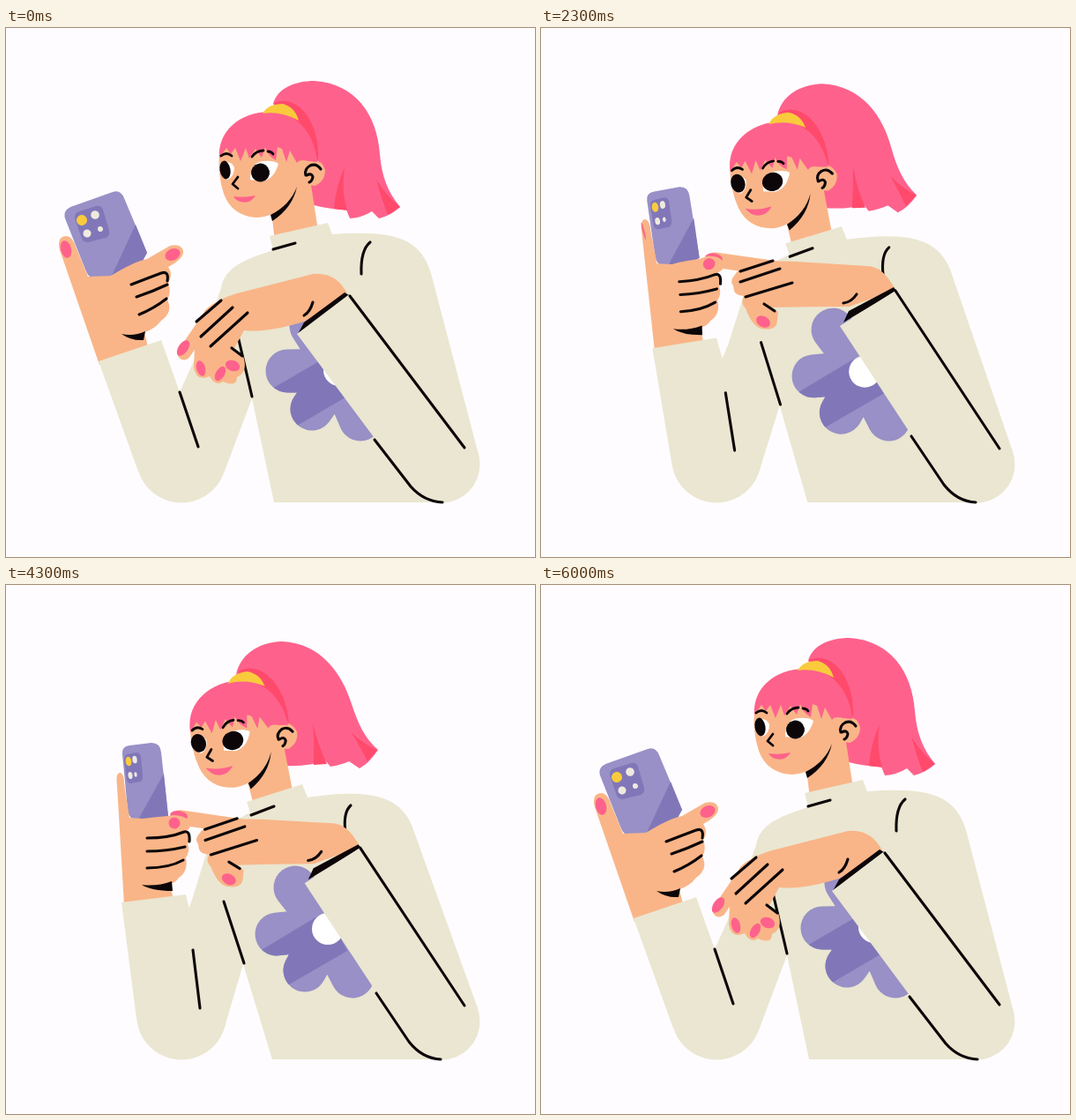
Write an HTML page with a canvas that moves like this. It is 600x600 px and loops after 6100 ms.

```html
<!DOCTYPE html>
<html lang="en">
<head>
<meta charset="utf-8">
<title>Scrolling on the phone</title>
<style>
  html, body { margin: 0; width: 100%; height: 100%; overflow: hidden; background: #fefcff; }
  canvas { display: block; width: 600px; height: 600px; }
</style>
</head>
<body>
<canvas id="stage" width="600" height="600"></canvas>
<script>
const ctx = document.getElementById('stage').getContext('2d');
const LOOP = 6100, STEP = 100;
const SHIRT = '#eae6d1', SKIN = '#f9b588', PINK = '#fe628c', DEEP = '#ff4a6c', INK = '#0c0609',
      LILAC = '#9890c6', VIOLET = '#8177b8', GOLD = '#f9cb3c', CREAM = '#efeade';

// Motion tracks: time, value, time, value, ...
const LEAN = [0,0, 200,.07, 500,.5, 800,.93, 1100,1, 1900,1, 2300,.83, 2600,.4, 2850,.08, 3000,0,
  3200,.07, 3500,.5, 3800,.93, 4200,1, 5000,1, 5300,.83, 5600,.4, 5850,.06, 6000,0, 6100,0];
const ARM = [0,0, 200,.26, 500,.7, 700,.9, 1000,1, 1900,1, 2100,.93, 2300,.82, 2600,.5, 2800,.15, 3000,0,
  3200,.26, 3500,.7, 3800,.92, 4200,1, 5000,1, 5300,.84, 5600,.54, 5800,.16, 6000,0, 6100,0];
const POINT = [0,0, 100,.03, 350,.55, 600,1, 5150,1, 5500,.5, 5800,.06, 6000,0, 6100,0];
const DROP = [0,0, 900,0, 1250,1, 1500,1, 1900,0, 3400,0, 3700,1, 4000,1, 4400,0, 6100,0];
const TIP = [0,262, 600,262, 950,251, 1300,266, 1600,266, 1900,251, 2300,263, 2600,270, 3300,270,
  3800,270, 4100,270, 4500,255, 4900,251, 5200,260, 6100,262];

const lerp = (a, b, k) => a + (b - a) * k;

// Smooth curve through the keys, flat at peaks and holds
function track(keys, t) {
  const last = keys.length / 2 - 1, T = i => keys[2 * i], V = i => keys[2 * i + 1];
  const slope = i => {
    if (i < 1 || i >= last || (V(i) - V(i - 1)) * (V(i + 1) - V(i)) <= 0) return 0;
    return (V(i + 1) - V(i - 1)) / (T(i + 1) - T(i - 1));
  };
  let i = 0;
  while (i < last - 1 && t >= T(i + 1)) i++;
  const d = T(i + 1) - T(i), u = (t - T(i)) / d, w = u * u * (3 - 2 * u);
  return lerp(V(i), V(i + 1), w) + d * (u * (1 - u) ** 2 * slope(i) - u * u * (1 - u) * slope(i + 1));
}

// Blend two path strings of the same structure
function mix(a, b, k) {
  const to = b.match(/[\d.]+/g);
  let i = 0;
  return a.replace(/[\d.]+/g, n => lerp(+n, +to[i++], k).toFixed(2));
}

function fill(d, color) {
  ctx.fillStyle = color;
  ctx.fill(new Path2D(d));
}

function line(d, width = 3.1, color = INK) {
  ctx.strokeStyle = color;
  ctx.lineWidth = width;
  ctx.stroke(new Path2D(d));
}

function oval(x, y, rx, ry, color, deg = 0) {
  ctx.fillStyle = color;
  ctx.beginPath();
  ctx.ellipse(x, y, Math.max(rx, 0), Math.max(ry, 0), deg * Math.PI / 180, 0, 7);
  ctx.fill();
}

function drawPonytail(k) {
  fill(mix('M303 86C308 68 328 60 350 60C396 63 421 98 424 143C426 168 433 186 447 203Q436 213 423 216L415 208Q404 215 390 216L386 206Q368 206 345 200L340 130Z',
           'M261 102C265 80 285 65 313 64C357 66 381 100 392 135C399 156 406 173 422 187Q412 202 401 208L389 200Q380 204 368 206L362 199Q345 206 317 205L305 140Z', k), PINK);
  fill(mix('M372 205Q374 180 384 158Q380 185 387 207Z', 'M349 204Q350 180 348 157Q354 182 364 203Z', k), DEEP);
  fill(mix('M420 172Q426 194 433 212L447 203Q431 190 420 172Z', 'M391 166Q402 184 410 200L421 187Q404 180 391 166Z', k), DEEP);
  fill(mix('M300 200L305 242L354 230L344 165Z', 'M272 215L281 250L326 238L313 172Z', k), SKIN);
}

function drawTorso(k) {
  fill(mix('M299 236L365 221L370 234C440 229 470 238 482 278L536 484L496 538L304 538L279 420L247 505L150 480L197 413L222 358L244 295C248 270 275 261 303 252Z',
           'M273 246L336 226L342 241C410 231 445 238 460 272L535 480L496 538L302 538L269 430L248 501L150 480L207 368L210 360L224 315C232 285 250 272 277 258Z', k), SHIRT);
  oval(494, 495, 43.5, 43.5, SHIRT);
  line(mix('M303 251L328 244', 'M278 261L304 251', k));
  line(mix('M413 243Q402 252 403 279', 'M391 250Q382 258 385 281', k));
  line(mix('M262 345L279 418', 'M247 359L270 429', k));
}

function drawFlower(k) {
  const petals = mix('M378 388L346 338M378 388L319 389M378 388L347 432M378 388L402 444',
                     'M365 390L328 343M365 390L307 396M365 390L339 437M365 390L393 444', k);
  line(petals, 49, LILAC);
  ctx.save();
  ctx.clip(new Path2D(mix('M295 413L362 374L380 372L402 409L320 457Z', 'M283 418L351 377L366 374L387 415L311 459Z', k)));
  line(petals, 49, VIOLET);
  ctx.restore();
  oval(lerp(378, 365, k), lerp(388, 390, k), 18, 18, '#fff');
}

function drawHead(k) {
  ctx.save();
  ctx.translate(lerp(346, 314.5, k), lerp(163, 170.5, k));
  ctx.rotate(-7 * k * Math.PI / 180);
  ctx.translate(-346, -163);
  fill('M304 85C330 74 356 105 354 150L320 110Z', DEEP);
  fill('M242 140Q240 168 247 188Q256 213 284 215Q306 214 322 196L332 176L350 179Q362 174 362 161Q358 148 345 150L340 130L300 110L255 118Z', SKIN);
  fill('M330 180Q322 201 300 212L302 219Q325 204 330 180Z', INK);
  line('M357 160Q352 153 345 156Q338 160 340 167M341 167Q347 164 348 169Q347 174 344 175');
  fill('M243 153Q254 149 259 158Q259 169 251 172Q245 170 243 160Z', '#fff');
  fill('M277 172Q277 152 292 151Q304 150 309 154Q304 172 290 174Z', '#fff');
  oval(lerp(248.5, 249.5, k), lerp(161, 160, k), lerp(6, 8.5, k), 10.5, INK, -10);
  oval(288.5, lerp(164, 162, k), lerp(10.5, 12, k), 10.5, INK, -10);
  line('M263 169L257 177L263 182', 2.8);
  fill(mix('M258 191Q270 193 283 190Q277 200 266 197Q261 196 258 191Z', 'M254 189Q270 194 285 190Q279 200 268 199Q260 198 254 189Z', k), PINK);
  fill('M242 147C240 118 264 95 300 95C328 95 350 118 353 152L343 151Q333 148 330 153L322 139L318 152L313 137L308 135L306 150Q297 145 294 135L290 147L283 137L276 148L272 136L266 151L260 136L255 143L250 136Z', PINK);
  line('M244 145Q250 140 256 145M279 146Q284 139 292 139M297 140Q301 140 303 143', 2.8);
  fill('M291 97Q297 86 314 86Q328 90 332 105Q312 94 291 97Z', GOLD);
  ctx.restore();
}

function drawPointingHand(h, drop, tipY) {
  const pose = (rest, up, down) => mix(rest, mix(up, down, drop), h);
  const bx = lerp(232, lerp(268, 272, drop), h), by = lerp(325, lerp(273, 281, drop), h);
  const tx = lerp(202, 197, h), ty = lerp(369, tipY, h);
  line(`M${bx} ${by}L${tx} ${ty}`, lerp(15, 17, h), SKIN);
  oval(tx - 1, ty - lerp(6, 2, h), 10, 5.5, PINK, Math.atan2(by - ty, bx - tx) * 180 / Math.PI);
  fill(pose(
    'M388 303Q375 276 348 279L270 299Q240 306 226 320L212 345Q212 350 214 360L213 385Q216 402 231 395Q238 407 246 401Q262 408 262 396Q275 390 269 372L258 365L270 343Q295 346 338 333Z',
    'M402 297Q388 270 370 270L290 265Q240 262 222 277L217 284Q215 289 218 292L219 298Q220 303 230 304Q226 312 232 318Q240 339 250 341Q268 344 268 331L269 322L262 317Q290 316 350 316Z',
    'M398 297Q385 272 370 272L290 270Q240 270 221 287L216 292Q213 297 217 302L218 307Q222 313 230 315Q226 320 233 326Q240 342 252 346Q270 350 273 337L272 328L262 322Q290 320 345 318Z'), SKIN);
  oval(lerp(221, 232, h), lerp(386, 315, h), 5 * (1 - h), 9 * (1 - h), PINK, -15);
  oval(lerp(243, 245, h), lerp(392, 328, h), 5 * (1 - h), 9 * (1 - h), PINK, 30);
  oval(lerp(257, 252 + 5 * drop, h), lerp(383, 333 + 5 * drop, h), 8.5, 6, PINK, lerp(20, 30 - 20 * drop, h));
  line(pose('M216 333L244 309M221 350L257 317M232 361L274 323',
            'M226 276L263 264M226 288L271 273M232 305L285 289',
            'M223 284L258 269M226 298L270 279M234 311L282 292'));
  line(pose('M256 363L268 372', 'M253 313L265 321', 'M252 320L266 325'));
  line(pose('M338 326Q345 322 348 311', 'M343 312Q352 311 358 302', 'M341 315Q350 313 356 304'));
  fill(pose('M338 334L384 300L389 303L331 347Z', 'M349 321L400 294L403 298L343 334Z', 'M347 322L397 295L400 298L341 335Z'), INK);
  fill(pose('M330 347L388 303L522 478L470 535L458 519Z', 'M339 338L402 298L522 478L470 535L457 518Z', 'M337 339L399 298L522 478L470 535L457 518Z'), SHIRT);
  line(pose('M390 304L520 476', 'M402 298L520 477', 'M400 299L520 477'));
  line(mix('M418 467L459 520Q474 537 495 538', 'M420 463L457 518Q472 537 493 538', h));
}

function drawPhoneArm(k) {
  fill(mix('M76 202L121 186Q130 183 134 193L160 255L150 270L105 286Q94 286 90 274L67 216Q64 206 76 202Z',
           'M140 182L165 179Q175 179 176 190L184 262L172 267L149 267Q139 266 138 255L132 192Q131 183 140 182Z', k), LILAC);
  fill(mix('M119 283L147 223L160 255L152 270Z', 'M150 266L179 214L184 262L172 267Z', k), VIOLET);
  fill(mix('M83 208L102 202Q108 201 110 206L117 230Q118 236 113 238L93 243Q88 243 86 239L78 216Q77 210 83 208Z',
           'M138 192L148 190Q152 190 153 195L155 216Q155 222 152 223L142 225Q138 225 137 221L134 198Q134 193 138 192Z', k), VIOLET);
  const lens = (ax, ay, bx, by, r, color) =>
    oval(lerp(ax, bx, k), lerp(ay, by, k), r * lerp(1, .55, k), r * lerp(1, .9, k), color, -8);
  lens(86, 218, 139, 200, 6, GOLD);
  lens(101, 212, 146, 198, 4.8, CREAM);
  lens(92, 233, 141, 216, 4.5, CREAM);
  lens(107, 228, 147, 215, 3, CREAM);

  fill(mix('M61 252Q57 236 69 236Q76 237 80 250L93 282L119 281Q145 265 160 262L186 247Q200 244 201 254Q201 262 184 271Q190 280 184 289Q188 300 183 308Q190 322 176 332Q168 342 157 345L161 362L106 382Z',
           'M126 228Q124 212 130 213Q134 215 134 225L140 264L155 265Q170 263 184 262L190 261Q208 262 209 272Q209 277 204 279Q211 286 206 293Q209 303 204 309Q207 325 196 332Q192 338 186 339L190 358L134 363Z', k), SKIN);
  oval(lerp(68, 127, k), lerp(251, 226, k), 6 * (1 - k), 10, PINK, -15);
  oval(lerp(189, 191, k), lerp(257, 270, k), lerp(9, 6.5, k), 6.5, PINK, -25);
  line(mix('M142 291Q160 284 176 278Q185 275 183 287M148 305Q166 299 183 291M151 325Q168 318 182 307',
           'M160 287Q185 287 202 280Q209 278 208 291M160 302Q182 302 203 297M160 321Q185 321 201 312', k));
  fill(mix('M131 347Q145 350 158 344L156 354Q142 355 131 347Z', 'M154 340Q172 342 188 336L189 347Q165 347 154 340Z', k), INK);

  oval(199, 487.5, 51, 51, SHIRT);
  fill(mix('M105 378L176 354L197 413L240 500L150 503Z', 'M131 360L204 351L208 368L240 500L148 492Z', k), SHIRT);
  line(mix('M197 413L218 475', 'M212 414L220 480', k));
}

function draw(t) {
  const lean = track(LEAN, t);
  ctx.fillStyle = '#fefcff';
  ctx.fillRect(0, 0, 600, 600);
  ctx.lineCap = ctx.lineJoin = 'round';
  drawPonytail(lean);
  drawTorso(lean);
  drawFlower(lean);
  drawHead(lean);
  drawPointingHand(track(POINT, t), track(DROP, t), track(TIP, t));
  drawPhoneArm(track(ARM, t));
}

const start = performance.now();
function tick() {
  const t = (performance.now() - start) % LOOP;
  draw(Math.floor(t / STEP) * STEP);
  requestAnimationFrame(tick);
}
tick();
</script>
</body>
</html>
```
